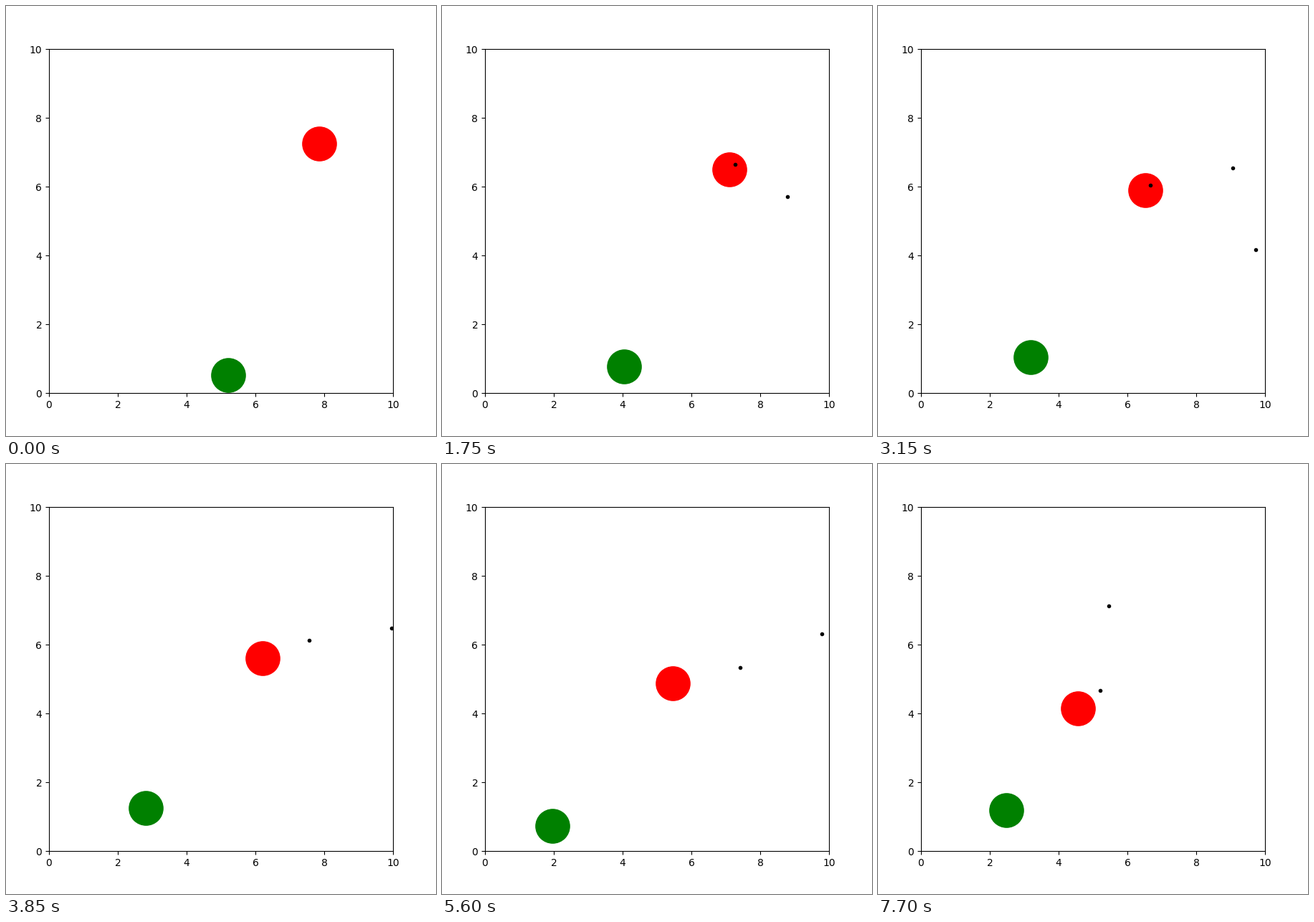
A matplotlib script for the animation above (8 s loop, 600 by 600 pixels).

```python
import numpy as np
import matplotlib.pyplot as plt
from matplotlib.animation import FuncAnimation

TICK = 50           # ms per drawn frame
LOOP = 8000         # ms per loop
STEP = 350          # ms per simulation step
RELOAD = 4          # steps between shots
BULLET_SPEED = 0.45
SHOT_ANGLES = np.radians([-58.8, -3.6, 4.7, -4.7, 90, 38.1])

# Turning points of the green disc: step, point, bow of the leg that follows
TURNS = [
    (0, (5.215, 0.515), (0, 0)),
    (1, (4.979, 0.646), (-0.08, -0.13)),
    (11, (2.815, 1.252), (0, 0)),
    (12, (2.752, 1.313), (0.01, -0.03)),
    (17, (1.752, 0.604), (0.09, 0.015)),
    (22, (2.477, 1.179), (0, 0)),
]


def green_pos(k):
    """Parabolic legs between turning points."""
    for (k0, p0, bow), (k1, p1, _) in zip(TURNS, TURNS[1:]):
        if k <= k1:
            break
    t = (k - k0) / (k1 - k0)
    p0, p1, bow = map(np.array, (p0, p1, bow))
    return p0 + (p1 - p0) * t + 4 * bow * t * (1 - t)


def red_pos(k):
    """Straight diagonal run whose fall slows after step 12."""
    slow = 0.0021 * max(k - 12, 0) ** 2
    return np.array([7.862 - 0.15 * k, 7.246 - 0.15 * k + slow])


def bullet_pos(i, k):
    """Shot i leaves the red disc and flies straight at constant speed."""
    start = i * RELOAD
    angle = SHOT_ANGLES[i]
    heading = np.array([np.cos(angle), np.sin(angle)])
    return red_pos(start) + BULLET_SPEED * (k - start - 1) * heading


fig = plt.figure(figsize=(6, 6), dpi=100)
ax = fig.add_axes([0.1, 0.1, 0.8, 0.8], xlim=(0, 10), ylim=(0, 10))


def add_dot(size, color):
    return ax.plot([], [], "o", ms=size, color=color)[0]


red = add_dot(34, "red")
green = add_dot(34, "green")
bullets = add_dot(3, "black")


def update(frame):
    k = frame * TICK // STEP
    red.set_data(*red_pos(k).reshape(2, 1))
    green.set_data(*green_pos(k).reshape(2, 1))
    fired = [bullet_pos(i, k) for i in range(len(SHOT_ANGLES))
             if k > i * RELOAD]
    bullets.set_data(*np.reshape(fired, (-1, 2)).T)
    return red, green, bullets


anim = FuncAnimation(fig, update, frames=LOOP // TICK, interval=TICK,
                     repeat=True, repeat_delay=0)
plt.show()
```
